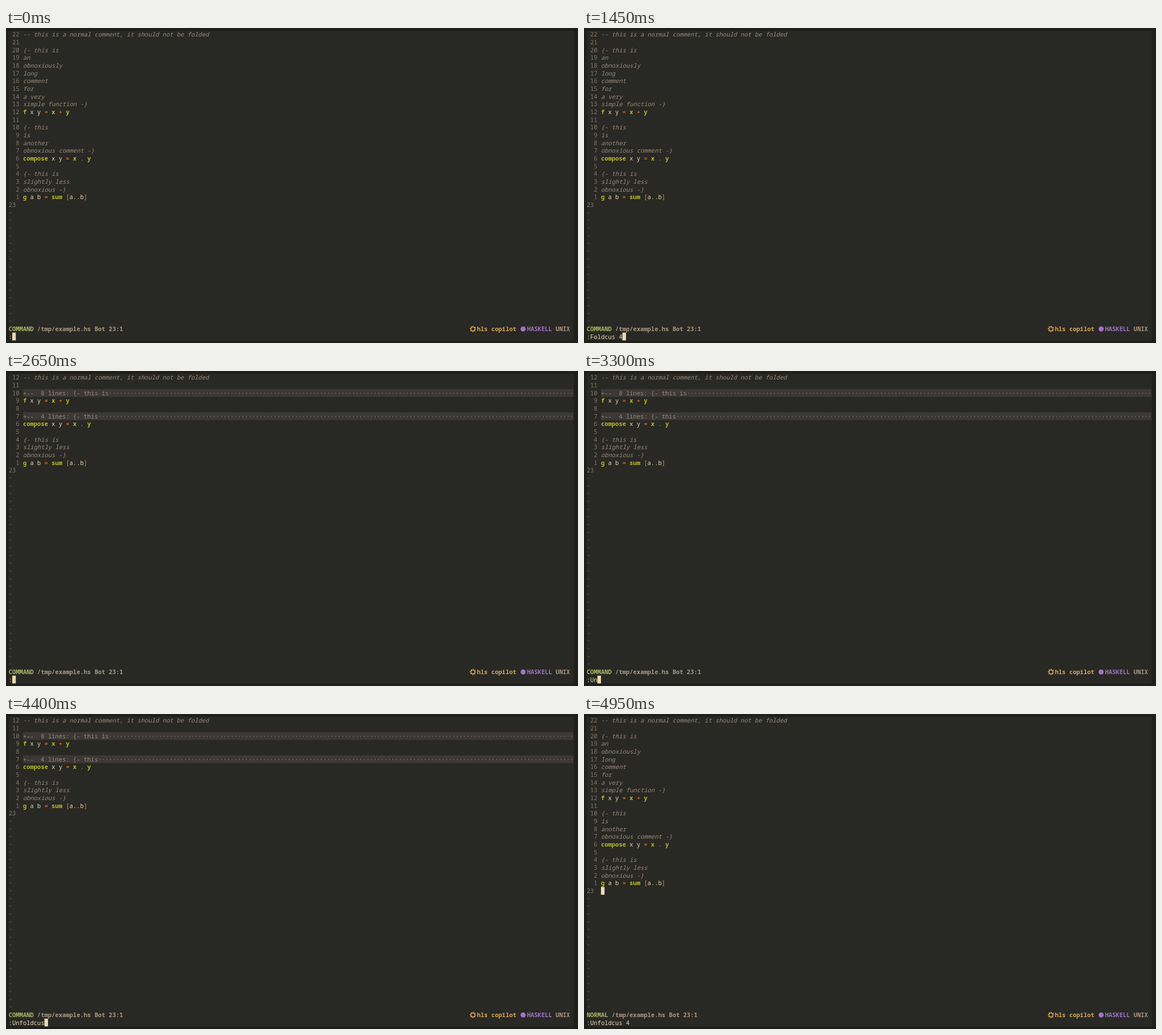
Write an HTML page that moves like this. It is 1008 by 556 pixels and loops after 6700 ms.

```html
<!DOCTYPE html>
<html lang="en">
<head>
<meta charset="utf-8">
<title>Comment folding</title>
<style>
  html, body { margin: 0; width: 100%; height: 100%; overflow: hidden; background: #1f201b; }
  svg { display: block; width: 100%; height: 100%; }
  text { font: 10.5px "Noto Sans Mono", "DejaVu Sans Mono", monospace; white-space: pre; fill: #ebdbb2; }
  .number { fill: #84786c; }
  .comment { fill: #9a8b7b; font-style: italic; }
  .fold { fill: #9a8b7b; }
  .name { fill: #b8bb26; font-weight: bold; }
  .operator { fill: #fe8019; }
  .tilde { fill: #665c54; }
  .mode { fill: #a9b665; font-weight: bold; }
  .path { fill: #a89984; font-weight: bold; }
  .server { fill: #d8a657; font-weight: bold; }
  .language { fill: #a074c4; font-weight: bold; }
</style>
</head>
<body>
<svg id="stage" viewBox="0 0 1008 556">
  <rect width="1008" height="556" fill="#1f201b"/>
  <rect x="5" y="5" width="995.4" height="546.8" fill="#282824"/>
</svg>
<script>
const LOOP = 6700, LEFT = 4.7, TOP = 4.6, CELL = 6.3, ROW = 13.67;
const COLUMNS = 158, STATUS_ROW = 38, COMMAND_ROW = 39;
const stage = document.getElementById("stage");
const colX = col => LEFT + col * CELL;
const rowY = row => TOP + row * ROW;

function add(parent, tag, attributes, content = "") {
  const node = document.createElementNS("http://www.w3.org/2000/svg", tag);
  for (const [key, value] of Object.entries(attributes)) node.setAttribute(key, value);
  node.textContent = content;
  return parent.appendChild(node);
}

function write(parent, col, row, content, style = "") {
  return add(parent, "text", { x: colX(col), y: rowY(row) + 10.8, class: style }, content);
}

const note = ["-- this is a normal comment, it should not be folded", ""];
const longComment = ["{- this is", "an", "obnoxiously", "long", "comment", "for", "a very", "simple function -}"];
const midComment = ["{- this", "is", "another", "obnoxious comment -}"];
const shortComment = ["{- this is", "slightly less", "obnoxious -}"];

// Code markup: *bold name*, `operator`, plain otherwise.
const sumF = "*f* x y `=` *x* `+` *y*";
const compose = "*compose* x y `=` *x* `.` *y*";
const sumG = "*g* a b `=` *sum* `[`a..b`]`";
const foldOf = lines => `+--  ${lines.length} lines: ${lines[0]}`;
const tail = [compose, "", ...shortComment, sumG, ""];

const openLines = [...note, ...longComment, sumF, "", ...midComment, ...tail];
const foldedLines = [...note, foldOf(longComment), sumF, "", foldOf(midComment), ...tail];

function writeCode(parent, row, line) {
  let col = 4;
  for (const part of line.match(/\*[^*]+\*|`[^`]+`|[^*`]+/g) || []) {
    const style = { "*": "name", "`": "operator" }[part[0]];
    const content = style ? part.slice(1, -1) : part;
    write(parent, col, row, content, style);
    col += content.length;
  }
}

function buildScreen(lines) {
  const group = add(stage, "g", {});
  const last = lines.length - 1;
  lines.forEach((line, row) => {
    const number = row === last ? "23" : String(last - row).padStart(3);
    write(group, 0, row, number, "number");
    if (line.startsWith("+--")) {
      add(group, "rect", { x: colX(4), y: rowY(row), width: (COLUMNS - 4) * CELL, height: ROW, fill: "#3c3836" });
      write(group, 4, row, line.padEnd(COLUMNS - 4, "·"), "fold");
    } else if (/[*`]/.test(line)) {
      writeCode(group, row, line);
    } else {
      write(group, 4, row, line, "comment");
    }
  });
  for (let row = lines.length; row < STATUS_ROW; row++) write(group, 0, row, "~", "tilde");
  return group;
}

const openScreen = buildScreen(openLines);
const foldedScreen = buildScreen(foldedLines);

const mode = write(stage, 0, STATUS_ROW, "", "mode");
const path = write(stage, 0, STATUS_ROW, "/tmp/example.hs Bot 23:1", "path");
const gear = add(stage, "g", { fill: "none", stroke: "#d8a657" });
const teeth = 2 * Math.PI * 4.6 / 16;
add(gear, "circle", { cx: 822.8, cy: 531.2, r: 3.3, "stroke-width": 1.4 });
add(gear, "circle", { cx: 822.8, cy: 531.2, r: 4.6, "stroke-width": 1.8,
  "stroke-dasharray": teeth, "stroke-dashoffset": teeth / 2 });
write(stage, 131, STATUS_ROW, "hls copilot", "server");
add(stage, "circle", { cx: 911.3, cy: 531.2, r: 4.5, fill: "#a074c4" });
write(stage, 145, STATUS_ROW, "HASKELL", "language");
write(stage, 153, STATUS_ROW, "UNIX", "path");

const command = write(stage, 0, COMMAND_ROW, "");
const cursor = add(stage, "rect", { width: CELL, height: ROW, fill: "#ebdbb2" });

const foldCommand = {
  text: ":Foldcus 4", start: 0, end: 1600,
  keys: [50, 350, 450, 550, 750, 850, 950, 1150, 1450]
};
const unfoldCommand = {
  text: ":Unfoldcus 4", start: 2650, end: 4950,
  keys: [2900, 3300, 3550, 3650, 3850, 3950, 4150, 4250, 4400, 4600, 4800]
};

function render(time) {
  const folded = time >= foldCommand.end && time < unfoldCommand.end;
  const active = [foldCommand, unfoldCommand].find(c => time >= c.start && time < c.end);
  const typed = active
    ? active.text.slice(0, 1 + active.keys.filter(key => key <= time).length)
    : time >= unfoldCommand.end ? unfoldCommand.text : "";
  const lines = folded ? foldedLines : openLines;
  const modeName = active ? "COMMAND" : "NORMAL";

  openScreen.style.display = folded ? "none" : "";
  foldedScreen.style.display = folded ? "" : "none";
  mode.textContent = modeName;
  path.setAttribute("x", colX(modeName.length + 1));
  command.textContent = typed;
  cursor.setAttribute("x", colX(active ? typed.length : 4));
  cursor.setAttribute("y", rowY(active ? COMMAND_ROW : lines.length - 1));
}

const origin = performance.now();
function tick() {
  render((performance.now() - origin) % LOOP);
  requestAnimationFrame(tick);
}
tick();
</script>
</body>
</html>
```
